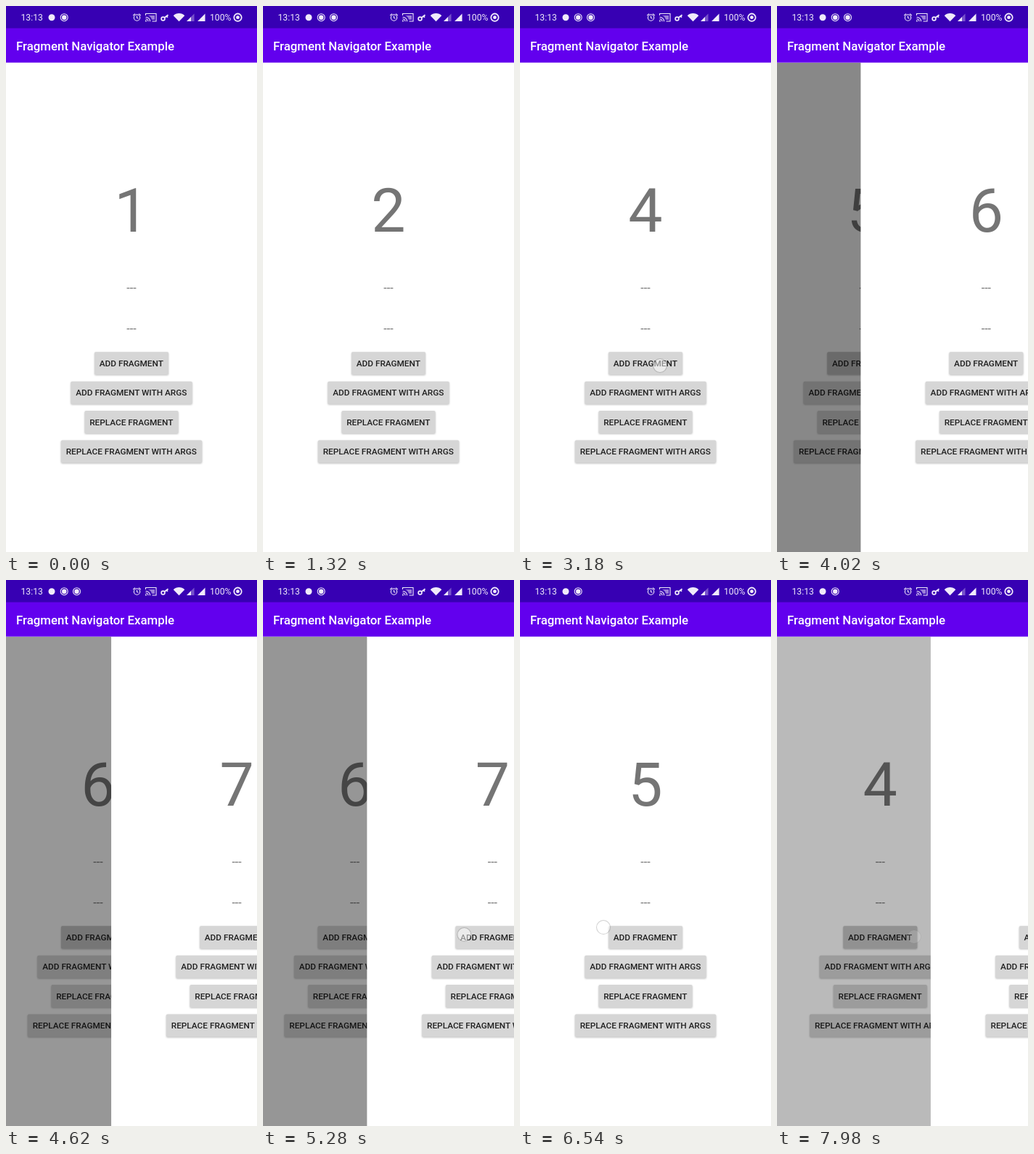
Write an HTML page that moves like this. It is 346 px wide and 750 px high and loops after 8000 ms.

```html
<!DOCTYPE html>
<html lang="en">
<head>
<meta charset="utf-8">
<title>Fragment Navigator Example</title>
<style>
  html, body { margin: 0; width: 100%; height: 100%; overflow: hidden; background: #fff; }
  body { position: relative; font-family: Roboto, sans-serif; }
  #status, #bar, #pages, .page, .dim, #touch { position: absolute; left: 0; }
  #status { top: 0; width: 346px; height: 30px; background: #3700b3; }
  #bar { top: 30px; width: 346px; height: 46px; background: #6200ee; color: #fff;
         border-top: 1px solid #4f00cd; border-bottom: 1px solid #8c45f2;
         font: 500 16.84px/48px Roboto, sans-serif; text-indent: 14px; white-space: nowrap; }
  #pages { top: 78px; width: 346px; bottom: 0; overflow: hidden; }
  .page { top: 0; width: 346px; height: 100%; background: #fff; overflow: hidden; }
  .page svg { position: absolute; left: 0; top: -78px; }
  .page .number { font-size: 84.2px; }
  .page .args { font-size: 16px; }
  .page .number, .page .args { fill: #757575; }
  .page .label { font-size: 11.8px; font-weight: 500; fill: #212121; }
  .dim { top: 0; width: 100%; height: 100%; background: #000; }
  #touch { top: 0; width: 18px; height: 18px; margin: -10px 0 0 -10px; border-radius: 50%;
           border: 1px solid rgba(120,120,120,.35); background: rgba(255,255,255,.5);
           background-clip: padding-box; }
</style>
</head>
<body>
<div id="pages"></div>
<div id="bar">Fragment Navigator Example</div>
<svg id="status" width="346" height="30" viewBox="0 0 346 30" fill="#f0eafa">
  <defs>
    <g id="record"><circle r="5" fill="none" stroke="#f0eafa" stroke-width="1.1"/><circle r="3.2"/></g>
  </defs>
  <text x="20.5" y="20.2" font-size="12.2">13:13</text>
  <circle cx="63" cy="15.7" r="4.5"/>
  <use href="#record" x="80.2" y="15.7"/>
  <use href="#record" id="second" x="97.5" y="15.7"/>
  <g fill="none" stroke="#f0eafa" stroke-width="1.1">
    <circle cx="180.5" cy="16" r="4.2"/>
    <path d="M180.5 13.5V16.2L182.5 17.4M175.2 13L178 10.7M185.8 13L183 10.7"/>
    <path d="M192.5 13V10.5H207V21H201.5M192.5 15.2A6 6 0 0 1 198.6 21.2M192.5 17.7A3.5 3.5 0 0 1 196 21.2"/>
    <circle cx="216.5" cy="17.5" r="2.4" stroke-width="1.7"/>
    <path d="M218.5 16L223.5 12.3M221.5 13.8L222.8 15.7" stroke-width="1.8"/>
    <circle cx="319.5" cy="15.7" r="5.2" stroke-width="1.8"/>
  </g>
  <path d="M195.5 13H205V18.8H201A8 8 0 0 0 195.5 13Z" opacity=".55"/>
  <circle cx="192.9" cy="20.6" r="1"/>
  <path d="M230.7 13.2A11 11 0 0 1 246.3 13.2L238.5 21.3Z"/>
  <path d="M249 21L259.5 10.5V21Z" opacity=".35"/>
  <path d="M249 21L255 15V21ZM264 21L274.5 10.5V21Z"/>
  <text x="281" y="20.2" font-size="12.2">100%</text>
  <circle cx="319.5" cy="15.7" r="2.4"/>
</svg>
<div id="touch"></div>
<script>
const LOOP = 8000, W = 346, PARALLAX = 0.229, MAX_DIM = 0.7;
const PUSH_MS = 400, SETTLE_MS = 240, TAP_LEAD = 100, TAP_FADE = 120;

// Each step moves between page `low` and the page above it.
const push = (at, low, tap = [193, 494]) => ({ at, low, tap });
const pop = (at, low, path) => ({ at, low, path });
const steps = [
  push(640, 1), push(1560, 2), push(2420, 3), push(3260, 4), push(3852, 5), push(4480, 6),
  pop(5060, 6, [[0, 134], [220, 277], [320, 312]]),
  pop(5780, 5, [[0, 122], [220, 260], [320, 300]]),
  pop(6520, 4, [[0, 115], [50, 115], [250, 255], [350, 300]]),
  push(7894, 4, [189, 490])
];

const clamp = x => Math.max(0, Math.min(1, x));
const decelerate = x => 1 - (1 - clamp(x)) ** 2;
const duration = path => path[path.length - 1][0];

function along(path, t) {
  for (let i = 1; i < path.length; i++) {
    const [t0, x0] = path[i - 1], [t1, x1] = path[i];
    if (t <= t1) return x0 + (x1 - x0) * clamp((t - t0) / (t1 - t0));
  }
  return path[path.length - 1][1];
}

const labels = [
  ['ADD FRAGMENT', 122, 102], ['ADD FRAGMENT WITH ARGS', 89.3, 167.4],
  ['REPLACE FRAGMENT', 108.5, 129], ['REPLACE FRAGMENT WITH ARGS', 75.8, 194.4]
];

function makePage() {
  const page = document.createElement('div');
  page.className = 'page';
  const buttons = labels.map(([text, x, w], i) => {
    const y = 475.3 + i * 40.4;
    return `<rect x="${x}" y="${y}" width="${w}" height="31" rx="1.7" fill="#d6d6d6"
      style="filter:drop-shadow(0 1px 1px rgba(0,0,0,.25))"/>
      <text class="label" x="172.8" y="${y + 19.7}">${text}</text>`;
  }).join('');
  page.innerHTML = `<svg width="346" height="750" text-anchor="middle">
    <text class="number" x="173" y="309.5"></text>
    <text class="args" x="173" y="392.5">---</text><text class="args" x="173" y="448.5">---</text>
    ${buttons}</svg><div class="dim"></div>`;
  document.getElementById('pages').append(page);
  return {
    page,
    number: page.querySelector('.number'),
    add: page.querySelector('rect'),
    dim: page.querySelector('.dim')
  };
}

const under = makePage(), over = makePage();
const touch = document.getElementById('touch');
const second = document.getElementById('second');
over.dim.style.opacity = 0;

function coverage({ at, path }, t) {
  const age = t - at;
  if (!path) return decelerate(age / PUSH_MS);
  const dragged = (along(path, age) - path[0][1]) / W;
  return (1 - dragged) * (1 - decelerate((age - duration(path)) / SETTLE_MS));
}

function finger(t) {
  for (const { at, path, tap } of steps) {
    const age = t - at;
    if (path) {
      const lifted = (age - duration(path)) / 80;
      if (age >= 0 && lifted < 1)
        return [along(path, age), 476 + 11 * clamp(age / 220), clamp(1 - lifted)];
    } else if (age >= -TAP_LEAD && age < TAP_FADE) {
      return [...tap, clamp(1 - age / TAP_FADE)];
    }
  }
  return [0, 0, 0];
}

function draw(t) {
  const step = steps.filter(s => s.at <= t).pop();
  const low = step ? step.low : 1;
  const p = step ? coverage(step, t) : 0;

  under.number.textContent = low;
  over.number.textContent = low + 1;
  under.page.style.transform = `translateX(${-W * PARALLAX * p}px)`;
  under.dim.style.opacity = MAX_DIM * p;
  over.page.style.transform = `translateX(${W * (1 - p)}px)`;
  over.page.style.visibility = p > 0 ? 'visible' : 'hidden';
  const pressed = step && step.tap && t - step.at < 300;
  under.add.setAttribute('fill', pressed ? '#c6c6c6' : '#d6d6d6');

  const [x, y, alpha] = finger(t);
  touch.style.transform = `translate(${x}px,${y}px)`;
  touch.style.opacity = alpha;
  second.style.visibility = t >= 180 && t < 4800 ? 'visible' : 'hidden';
}

const start = performance.now();
function tick(now) {
  draw(Math.max(0, now - start) % LOOP);
  requestAnimationFrame(tick);
}
draw(0);
requestAnimationFrame(tick);
</script>
</body>
</html>
```
